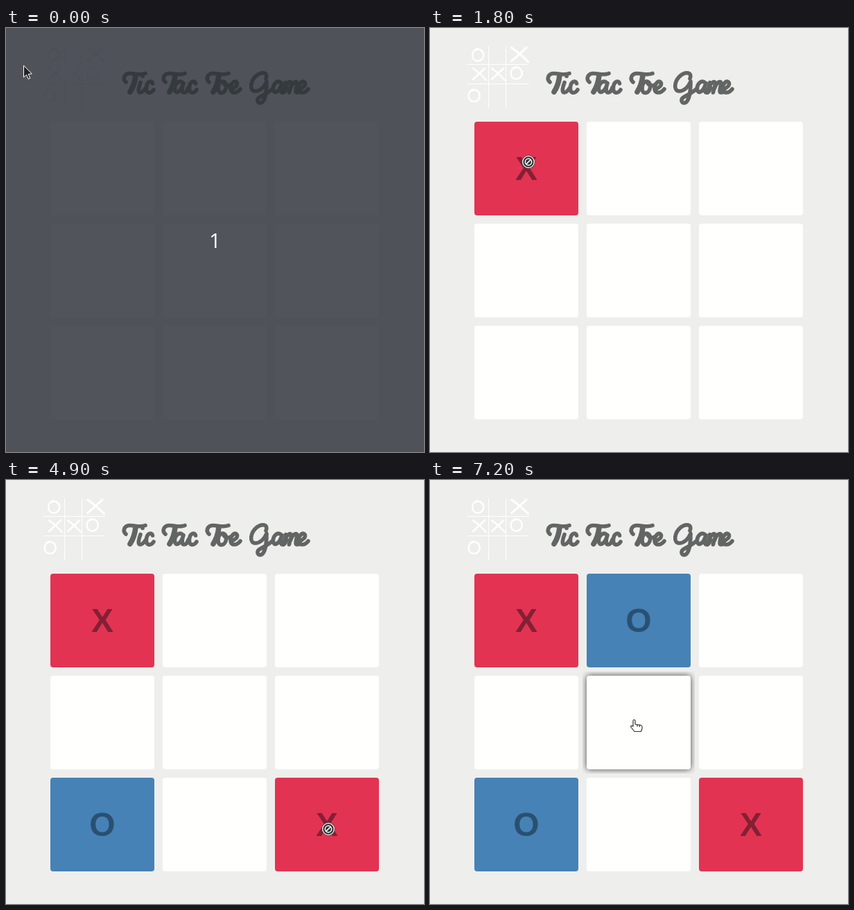
Write an HTML page that moves like this. It is 603 by 611 pixels and loops after 8 s.

```html
<!DOCTYPE html>
<html lang="en">
<head>
<meta charset="utf-8">
<title>Tic Tac Toe Game</title>
<style>
  html, body { margin: 0; width: 100%; height: 100%; overflow: hidden; }
  body { position: relative; background: #eeeeec; }
  svg { position: absolute; left: 0; top: 0; overflow: visible; }
  .art { width: 603px; height: 611px; fill: none; stroke-linecap: round; stroke-linejoin: round; }
  .icon { stroke: #fff; stroke-width: 2.5; }
  .icon .grid { stroke-width: 1.1; }
  .lettering { stroke: #636564; stroke-width: 5.6; }
  .stem { stroke-width: 7.6; }
  .board {
    position: absolute; left: 64px; top: 135px;
    display: grid; grid-template: repeat(3, 135px) / repeat(3, 150px); gap: 12px;
  }
  .cell {
    border-radius: 4px; background: #fffffe; text-align: center;
    font: bold 48px/135px "Liberation Sans", Arial, sans-serif;
  }
  .cell.X { background: #e23352; color: #832036; }
  .cell.O { background: #4682b6; color: #2a5071; }
  .cell.hover { box-shadow: 0 0 10px #444; clip-path: inset(-6px); }
  .count {
    display: none; position: absolute; left: 0; width: 603px; top: 284px;
    text-align: center; color: #fff; font: 30px/44px "Open Sans", "Noto Sans", sans-serif;
  }
  .waiting { background: #50525a; }
  .waiting .cell { background: #52545c; }
  .waiting .icon { stroke: #4d5058; }
  .waiting .lettering { stroke: #343a3d; }
  .waiting .count { display: block; }
  #pointer { width: 1px; height: 1px; }
  #pointer g { display: none; stroke-linejoin: round; stroke-linecap: round; }
  #pointer.arrow .arrow, #pointer.hand .hand, #pointer.blocked .blocked { display: block; }
</style>
</head>
<body>
<svg class="art" role="img" aria-label="Tic Tac Toe Game">
  <defs>
    <g id="T">
      <path d="M173 78C168 74 170 66 178 65.500C186 65 192 69 201 65.500"/>
      <path class="stem" d="M187 68C186 78 183 86 179 92"/>
    </g>
    <g id="i">
      <path d="M194 78.500C191 86 190 93 193.500 93C196.500 93 199 90 201 87"/>
      <path d="M197 69.500h.1"/>
    </g>
    <path id="c" d="M211.500 80C211 75 203 76 202.500 86C202 95 209 95 213 89"/>
    <path id="a" d="M255.500 79.500C250 73 243 81 243.500 88C244 96 252 93 256 79.500C253 88 254 93 257 93C260 93 262 89 263 86"/>
    <path id="o" d="M313 77C305 76 303.500 93.500 310.500 93.500C318 93.500 321 79 313 77C315 83 320 84 324 82"/>
    <path id="e" d="M324.500 88C331 86.500 335 82 333 78.500C330 74 323.500 81 324 88C324.500 95 333 94.500 338 88"/>
    <path id="G" d="M375 73C379 64 369 62.500 362 68C352 76 351 90 359 91C367 91 373 84 376 77C376 90 374 107 367 108C362 108 361 102 367 99C374 95 381 92 385 87"/>
    <path id="m" d="M403.500 78.500C403 84 401 90 400 93M402 87C405 78 411.500 75 411.500 80C411.500 84 409 89 408.500 93M410.500 87C413 78 420 75 420 80C419 86 416 93 420 93C422 93 424 90 425 87"/>
    <path id="ring" d="M-2-9C-11-6-10 8.500-1 8.500C11 8.500 10-8 0-8.500L-4-7"/>
    <path id="cross" d="M-9-8Q1-1 10 9M8-8Q1-1-9 8"/>
  </defs>
  <g class="icon">
    <path class="grid" d="M84.500 27V115M109.500 27V115M54 52.500H142M54 80.500H142"/>
    <use href="#ring" x="69.500" y="39"/>
    <use href="#ring" x="125" y="65"/>
    <use href="#ring" x="64" y="97.500"/>
    <use href="#cross" transform="translate(129 38) scale(1.250 1.200)"/>
    <use href="#cross" x="71" y="66"/>
    <use href="#cross" x="98" y="66"/>
  </g>
  <g class="lettering">
    <use href="#T"/><use href="#i"/><use href="#c"/>
    <use href="#T" x="57"/><use href="#a"/><use href="#c" x="62"/>
    <use href="#T" x="120"/><use href="#o"/><use href="#e"/>
    <use href="#G"/><use href="#a" x="142"/><use href="#m"/><use href="#e" x="98"/>
  </g>
</svg>
<div class="board"></div>
<div class="count">1</div>
<svg id="pointer">
  <g class="arrow">
    <path d="M.5.5V17L4.500 13.500L7.200 19.500L9.800 18.400L7.200 12.500L12 12Z" fill="#222" stroke="#fff"/>
  </g>
  <g class="hand" stroke="#333" stroke-width="1.200">
    <path d="M-2 9V1Q-2-.5-.5-.5T1 1V6L9 7.300Q11 8 11 10V12Q10.500 15 9 16.500H0L-5.500 9.500Q-5 7-2 9Z" fill="#fff"/>
    <path d="M4 6.800V9M7.300 7.300V9.500" fill="none"/>
  </g>
  <g class="blocked" fill="#333" stroke="#fff">
    <circle r="9.500" stroke="none"/>
    <circle r="8.300" stroke-width="1.300"/>
    <circle r="4.700" stroke-width="1.500"/>
    <path d="M-3 3L3-3" stroke-width="1.700"/>
  </g>
</svg>
<script>
const LOOP = 8000, STEP = 100;
const start = [25, 54];
// Pointer moves: start time, end time, destination x, y
const moves = [
  [100, 400, 47, 81], [500, 900, 133, 160], [1000, 1100, 142, 193],
  [2000, 2400, 150, 390], [2500, 2600, 158, 446], [2700, 2800, 168, 482],
  [2900, 3000, 168, 485], [3000, 3100, 163, 492], [3200, 3300, 168, 487],
  [3400, 3500, 181, 497], [3600, 4500, 450, 502], [4500, 4600, 465, 503],
  [5100, 6000, 315, 223], [6000, 6100, 309, 218], [6800, 7200, 295, 346]
];
// Turns: time, cell index, mark
const turns = [[1800, 0, 'X'], [3100, 6, 'O'], [4900, 8, 'X'], [6800, 1, 'O']];

const board = document.querySelector('.board');
const pointer = document.getElementById('pointer');
const cells = Array.from({ length: 9 }, () => {
  const cell = document.createElement('div');
  board.append(cell);
  return cell;
});

function pointerAt(t) {
  let [x, y] = start;
  for (const [from, to, toX, toY] of moves) {
    const p = Math.min(1, Math.max(0, (t - from) / (to - from)));
    x += (toX - x) * p;
    y += (toY - y) * p;
  }
  return [x, y];
}

function cellAt(x, y) {
  const col = Math.floor((x - 64) / 162), row = Math.floor((y - 135) / 147);
  const inside = col >= 0 && col < 3 && row >= 0 && row < 3 &&
    x - 64 - col * 162 < 150 && y - 135 - row * 147 < 135;
  return inside ? row * 3 + col : -1;
}

function draw(t) {
  const marks = Array(9).fill('');
  for (const [time, cell, mark] of turns) if (t >= time) marks[cell] = mark;
  const [x, y] = pointerAt(t);
  const over = cellAt(x, y);

  document.body.className = t < 100 ? 'waiting' : '';
  cells.forEach((cell, i) => {
    const hover = i === over && !marks[i] ? 'hover' : '';
    cell.className = `cell ${marks[i]} ${hover}`;
    if (cell.textContent !== marks[i]) cell.textContent = marks[i];
  });
  pointer.setAttribute('class', over < 0 ? 'arrow' : marks[over] ? 'blocked' : 'hand');
  pointer.style.transform = `translate(${Math.round(x)}px, ${Math.round(y)}px)`;
}

const origin = performance.now();
function tick() {
  const t = (performance.now() - origin) % LOOP;
  draw(Math.floor(t / STEP) * STEP);
  requestAnimationFrame(tick);
}
tick();
</script>
</body>
</html>
```
